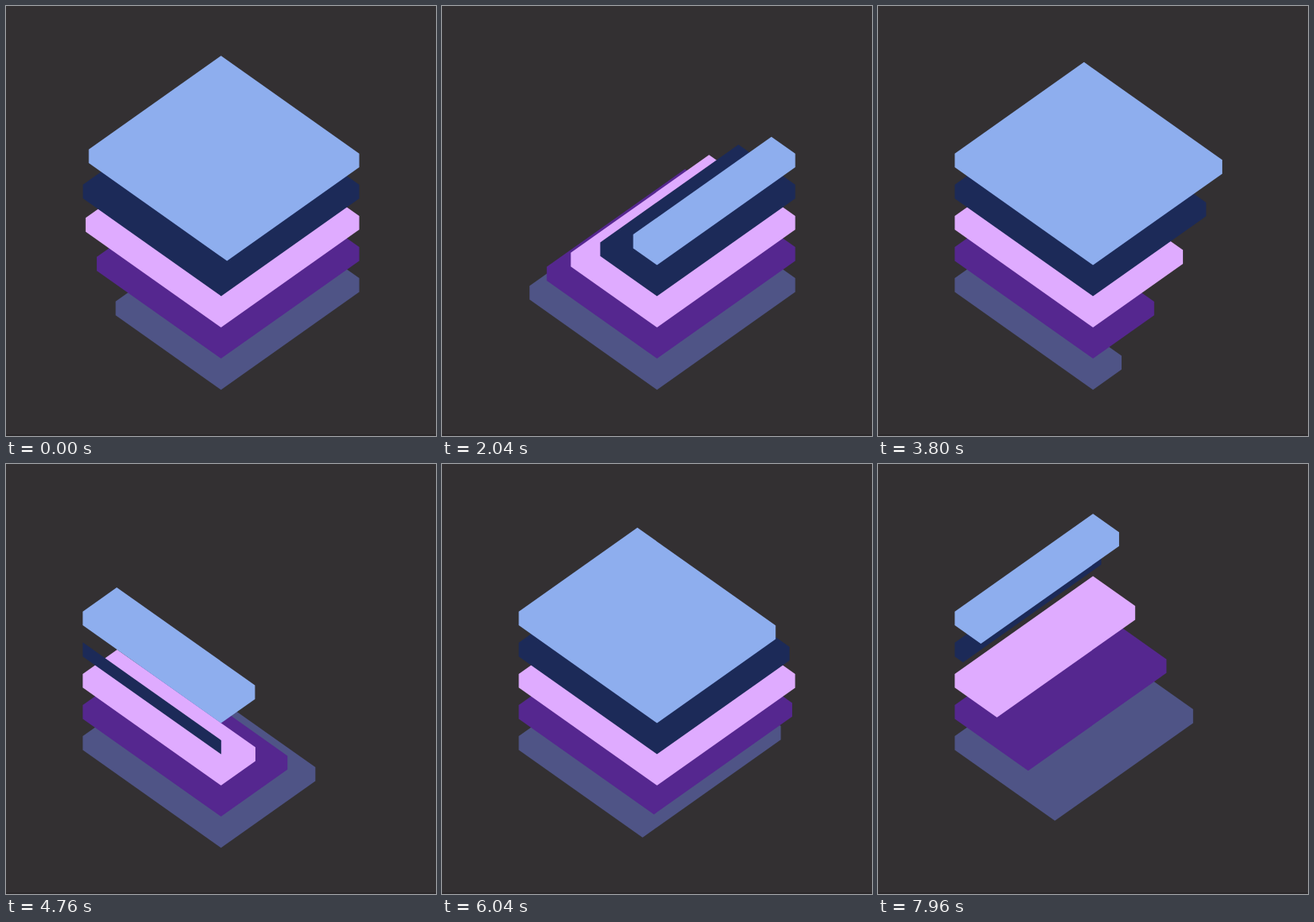
Write an HTML page that moves like this. It is 512 px wide and 512 px high and loops after 8 s.

```html
<!DOCTYPE html>
<html lang="en">
<head>
<meta charset="utf-8">
<title>Folding layers</title>
<style>
  html, body { margin: 0; width: 100%; height: 100%; overflow: hidden; background: #333032; }
  svg { display: block; width: 100%; height: 100%; }
</style>
</head>
<body>
<svg id="stage" viewBox="0 0 512 512">
  <rect width="512" height="512" fill="#333032"/>
  <rect y="510" width="512" height="2" fill="#2c292b"/>
</svg>
<script>
const LOOP = 8000, STEP = 40;
const COLORS = ['#8eaeee', '#1c2a58', '#dfabff', '#55278f', '#4f5486'];
const CENTER_X = 256, TOP_Y = 59.3, HALF_W = 164.6, HALF_H = 116.4;
const THICKNESS = 16.4, LAYER_GAP = 37.1;
const START_ANGLE = -0.296, LAYER_LEAD = 0.25;

const stage = document.getElementById('stage');
const slabs = COLORS.map(color => {
  const slab = document.createElementNS('http://www.w3.org/2000/svg', 'polygon');
  slab.setAttribute('fill', color);
  return slab;
});
stage.append(...slabs.slice().reverse());

// Each half turn folds the slab against one side and opens it again.
function extents(angle) {
  const fold = 1 - Math.abs(Math.cos(angle));
  const side = (Math.floor(angle / Math.PI) + 4) % 4;
  const area = { p0: 0, q0: 0, p1: 1, q1: 1 };
  if (side === 0) area.p0 = fold;
  if (side === 1) area.q0 = fold;
  if (side === 2) area.p1 = 1 - fold;
  if (side === 3) area.q1 = 1 - fold;
  return area;
}

function outline(layer, { p0, q0, p1, q1 }) {
  const at = (p, q, drop = 0) => [
    CENTER_X + HALF_W * (p - q),
    TOP_Y + HALF_H * (p + q) + LAYER_GAP * layer + drop
  ].map(n => n.toFixed(2)).join();
  return [
    at(p0, q0), at(p1, q0), at(p1, q0, THICKNESS),
    at(p1, q1, THICKNESS), at(p0, q1, THICKNESS), at(p0, q1)
  ].join(' ');
}

function draw() {
  const time = Math.floor(performance.now() % LOOP / STEP) * STEP / 1000;
  slabs.forEach((slab, layer) => {
    const angle = time + START_ANGLE + layer * LAYER_LEAD;
    slab.setAttribute('points', outline(layer, extents(angle)));
  });
  requestAnimationFrame(draw);
}
draw();
</script>
</body>
</html>
```
